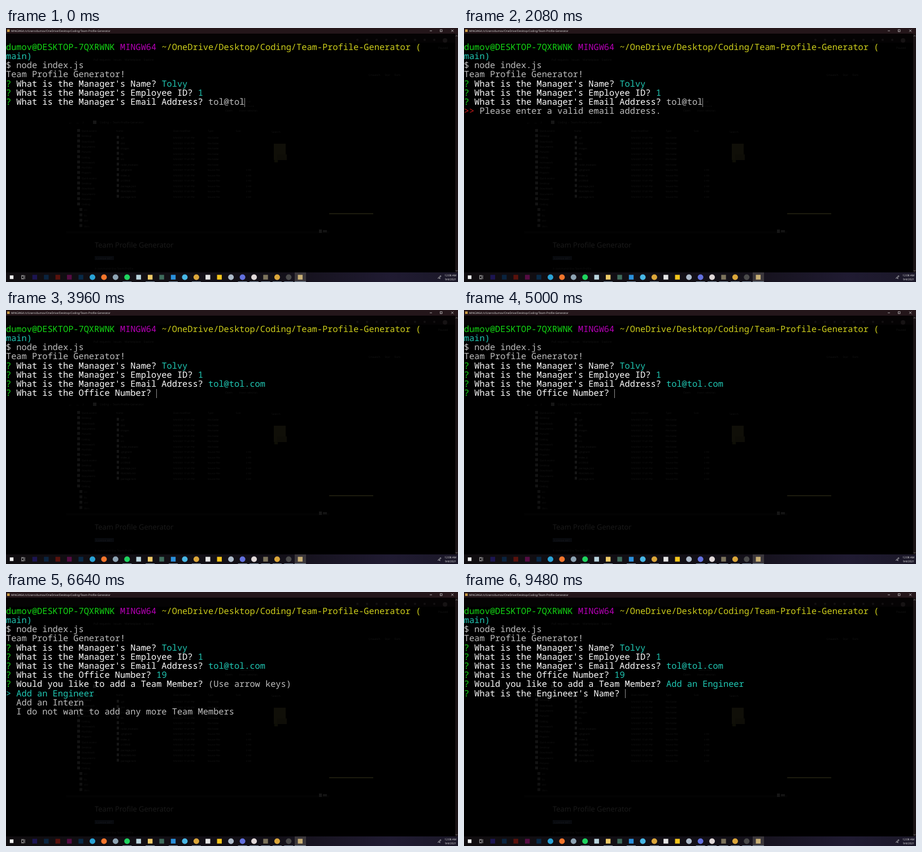
Animation, 800 px wide and 450 px high, one loop 9.52 s. Source, as an HTML page with a canvas:

```html
<!DOCTYPE html>
<html lang="en">
<head>
<meta charset="utf-8">
<title>Team Profile Generator</title>
<style>
html, body { margin: 0; width: 100%; height: 100%; overflow: hidden; background: #000; }
canvas { display: block; }
</style>
</head>
<body>
<canvas id="stage" width="800" height="450"></canvas>
<script>
const ctx = document.getElementById('stage').getContext('2d');
const LOOP = 9520, CELL = 9.18, ROW = 16.2, TOP = 26.7;
const MONO = '15.3px "Noto Sans Mono", monospace';
const UI = '"Open Sans", sans-serif';
const GREEN = '#14d814', PURPLE = '#b800b8', YELLOW = '#cfcf1c', CYAN = '#20c8b4',
      GREY = '#bfbfbf', WHITE = '#fff', RED = '#d01c1c';
const NAME = 'Tolvy', EMAIL = 'tol@tol.com', USER = 'dumov';

function box(x, y, w, h, color) {
  ctx.fillStyle = color;
  ctx.fillRect(x, y, w, h);
}
function dot(x, y, r, color) {
  ctx.fillStyle = color;
  ctx.beginPath();
  ctx.arc(x, y, r, 0, 7);
  ctx.fill();
}
function line(color, ...points) {
  ctx.strokeStyle = color;
  ctx.lineWidth = 0.7;
  ctx.beginPath();
  points.forEach(([x, y]) => ctx.lineTo(x, y));
  ctx.stroke();
}
function label(text, x, y, size, color, align = 'left') {
  ctx.font = `${size}px ${UI}`;
  ctx.textAlign = align;
  ctx.fillStyle = color;
  ctx.fillText(text, x, y);
}

// Windows faintly showing through the terminal
function ghosts() {
  box(0, 10, 795, 16, '#050304');
  for (let x = 622; x < 770; x += 17) dot(x, 21, 2, '#141112');
  dot(777, 22, 4, '#161314');
  label('Paused', 765, 37, 5, '#151515');
  label('Pull requests    Issues    Marketplace    Explore', 155, 58, 5, '#141414');
  label('Unwatch      Star      Fork', 642, 85, 5, '#141414');
  box(107, 360, 465, 4, '#030303');
  label('Select all', 415, 132, 4.5, '#101010');
  label('Select none', 415, 140, 4.5, '#101010');
  label('Open', 388, 148, 5, '#141414');
  label('Invert selection', 413, 148, 4.5, '#141414');
  label('←   →   ↑', 110, 170, 7, '#161616');
  box(154, 164, 6, 6, '#161616');
  label('Coding  ›  Team-Profile-Generator', 166, 169, 5, '#141414');
  label('Search', 470, 186, 5, '#131313');
  label('Name', 195, 184, 4.5, '#151515');
  label('Date modified', 296, 184, 4.5, '#151515');
  label('Type', 357, 184, 4.5, '#151515');
  label('Size', 407, 184, 4.5, '#151515');

  const side = ['Quick access', 'Desktop', 'Downloads', 'Documents', 'Pictures', 'Coding', 'Homework', 'Portfolio', 'Projects'];
  for (let i = 0; i < 15; i++) {
    const y = 184 + i * 9.3;
    box(126, y - 5, 5, 5, '#141414');
    label(side[i % side.length], 134, y, 4.5, '#151515');
  }
  ['src', 'lib', 'dist', 'docs'].forEach((s, i) => {
    box(130, 319 + i * 9.5, 5, 5, '#111');
    label(s, 138, 324 + i * 9.5, 4.5, '#121212');
  });

  const files = ['.git', 'dist', 'images', 'lib', 'src', 'node_modules', '.gitignore', 'index.js', 'LICENSE', 'package.json', 'README.md', 'package-lock'];
  files.forEach((name, i) => {
    const y = 196 + i * 9.5;
    box(196, y - 5, 4, 5, '#161616');
    label(name, 203, y, 4.5, '#171717');
    label('9/3/2021 11:41 PM', 296, y, 4.3, '#151515');
    label(i < 6 ? 'File folder' : 'Source File', 357, y, 4.3, '#151515');
    if (i > 5) label('2 KB', 434, y, 4.3, '#151515', 'right');
  });
  box(474, 205, 21, 29, '#100f08');
  box(480, 224, 17, 10, '#0e0d07');
  box(475, 233, 6, 5, '#0e0e06');
  box(572, 328, 78, 2, '#1c1b0e');
  box(554, 357, 5, 6, '#161616');
  box(561, 358, 7, 4, '#131313');
  label('Team Profile Generator', 157, 389, 12.9, '#1b1b1b');
  box(157, 404, 34, 7, '#080a0e');
  label('License MIT', 160, 410, 5, '#16181c');
  label('A command-line Team Profile', 157, 428, 5, '#111');
}

function titleBar() {
  box(0, 0, 800, 10, '#24161a');
  box(2, 2.5, 4.5, 4.5, '#c99b45');
  label(`MINGW64:/c/Users/${USER}/OneDrive/Desktop/Coding/Team-Profile-Generator`, 9, 6.7, 4.84, '#e4e4e4');
  line('#ddd', [750, 5], [754, 5]);
  ctx.strokeStyle = '#ddd';
  ctx.strokeRect(768.5, 3, 3.4, 3.4);
  line('#ddd', [788, 2.8], [792, 6.8]);
  line('#ddd', [792, 2.8], [788, 6.8]);
  box(795, 10, 5, 423, '#1a1315');
  line('#8a8a8a', [795.8, 15], [797.5, 13], [799.2, 15]);
  line('#8a8a8a', [795.8, 429], [797.5, 431], [799.2, 429]);
}

// Round icons start with "o", square ones with "s"
const ICONS = ('s#f4f4f4 - s#1c1552 s#0a2440 s#5a120c s#560c44 s#082a48 o#2aa3d6 o#f5762c o#8ea4b4 ' +
  'o#1ed45f s#b9d5de s#efcb68 s#3f6c5c s#2a90dc o#48b7e6 o#dba63a s#e4e4e4 s#f5c61c o#aebccb ' +
  'o#6371df o#e0d8d8 s#7d745c o#dba63a o#4a4a4a s#c9b075').split(' ');
const RUNNING = [10, 12, 14, 16, 20, 21, 22, 23, 24, 25];

function taskbar() {
  const shade = ctx.createLinearGradient(0, 0, 800, 0);
  shade.addColorStop(0, '#100d10');
  shade.addColorStop(0.6, '#131018');
  shade.addColorStop(0.85, '#201b32');
  shade.addColorStop(1, '#1b1828');
  box(0, 433, 800, 17, shade);
  box(511, 433, 20, 17, '#3b373c');
  ICONS.forEach((icon, i) => {
    const x = 10 + i * 20.43, color = icon.slice(1);
    if (RUNNING.includes(i)) box(x - (i == 25 ? 10 : 8), 449, i == 25 ? 20 : 16, 1, '#8294a6');
    if (icon[0] == 'o') dot(x, 441.5, 5, color);
    if (icon[0] == 's') {
      const r = i == 0 ? 3.2 : 4.2;
      box(x - r, 441.5 - r, 2 * r, 2 * r, color);
    }
  });
  ctx.strokeStyle = '#ccc';
  ctx.lineWidth = 0.7;
  ctx.strokeRect(27.5, 439.8, 4, 3.5);
  line('#ccc', [27, 438.3], [32, 438.3]);
  line('#ccc', [27, 444.8], [32, 444.8]);
  line('#ccc', [33.2, 438], [33.2, 445]);
  line('#ddd', [764, 444], [769, 438.5], [770, 440], [766, 443.5], [769, 444]);
  label('12:08 AM', 797, 439.7, 4.8, '#f0f0f0', 'right');
  label('9/4/2021', 797, 447, 4.8, '#f0f0f0', 'right');
}

// Prints coloured parts and returns the column after them
function print(row, ...parts) {
  ctx.font = MONO;
  ctx.textAlign = 'left';
  let col = 0;
  for (const [text, color] of parts) {
    ctx.fillStyle = color;
    ctx.fillText(text, col * CELL, TOP + row * ROW + 12);
    col += text.length;
  }
  return col;
}
const ask = (row, question, answer = '', color = CYAN) =>
  print(row, ['? ', GREEN], [question + ' ', WHITE], [answer, color]);

const countPast = (t, times) => times.filter(at => t >= at).length;
const BLINKS = [200, 720, 1520, 2080, 2520, 3040, 4480, 5000, 8200, 8720, 9360, 9480];

function terminal(t) {
  print(0, [USER + '@DESKTOP-7QXRWNK ', GREEN], ['MINGW64 ', PURPLE],
    ['~/OneDrive/Desktop/Coding/Team-Profile-Generator (', YELLOW]);
  print(1, ['main)', CYAN]);
  print(2, ['$ node index.js', GREY]);
  print(3, ['Team Profile Generator!', GREY]);
  ask(4, "What is the Manager's Name?", NAME);
  ask(5, "What is the Manager's Employee ID?", '1');

  const sent = t >= 3920;
  const typed = EMAIL.slice(0, 7 + countPast(t, [3040, 3320, 3440, 3560]));
  let row = 6, col = ask(6, "What is the Manager's Email Address?", typed, sent ? CYAN : GREY);
  if (t >= 960 && t < 3040) print(7, ['>> ', RED], ['Please enter a valid email address.', GREY]);

  if (sent) {
    const office = '19'.slice(0, countPast(t, [5520, 5680]));
    row = 7;
    col = ask(7, 'What is the Office Number?', office, t < 6040 ? GREY : CYAN);
  }
  const choosing = t >= 6040 && t < 7520;
  if (choosing) {
    ask(8, 'Would you like to add a Team Member?', '(Use arrow keys)', GREY);
    print(9, ['> Add an Engineer', CYAN]);
    print(10, ['  Add an Intern', GREY]);
    print(11, ['  I do not want to add any more Team Members', GREY]);
  } else if (t >= 7520) {
    ask(8, 'Would you like to add a Team Member?', 'Add an Engineer');
    row = 9;
    col = ask(9, "What is the Engineer's Name?");
  }
  if (!choosing && countPast(t, BLINKS) % 2 == 0)
    box(Math.round(col * CELL), Math.round(TOP + row * ROW), 1, 16, '#8c8c8c');
}

function draw(now) {
  ctx.textRendering = 'geometricPrecision';
  box(0, 0, 800, 450, '#000');
  ghosts();
  titleBar();
  taskbar();
  terminal(now % LOOP);
  requestAnimationFrame(draw);
}
requestAnimationFrame(draw);
</script>
</body>
</html>
```
